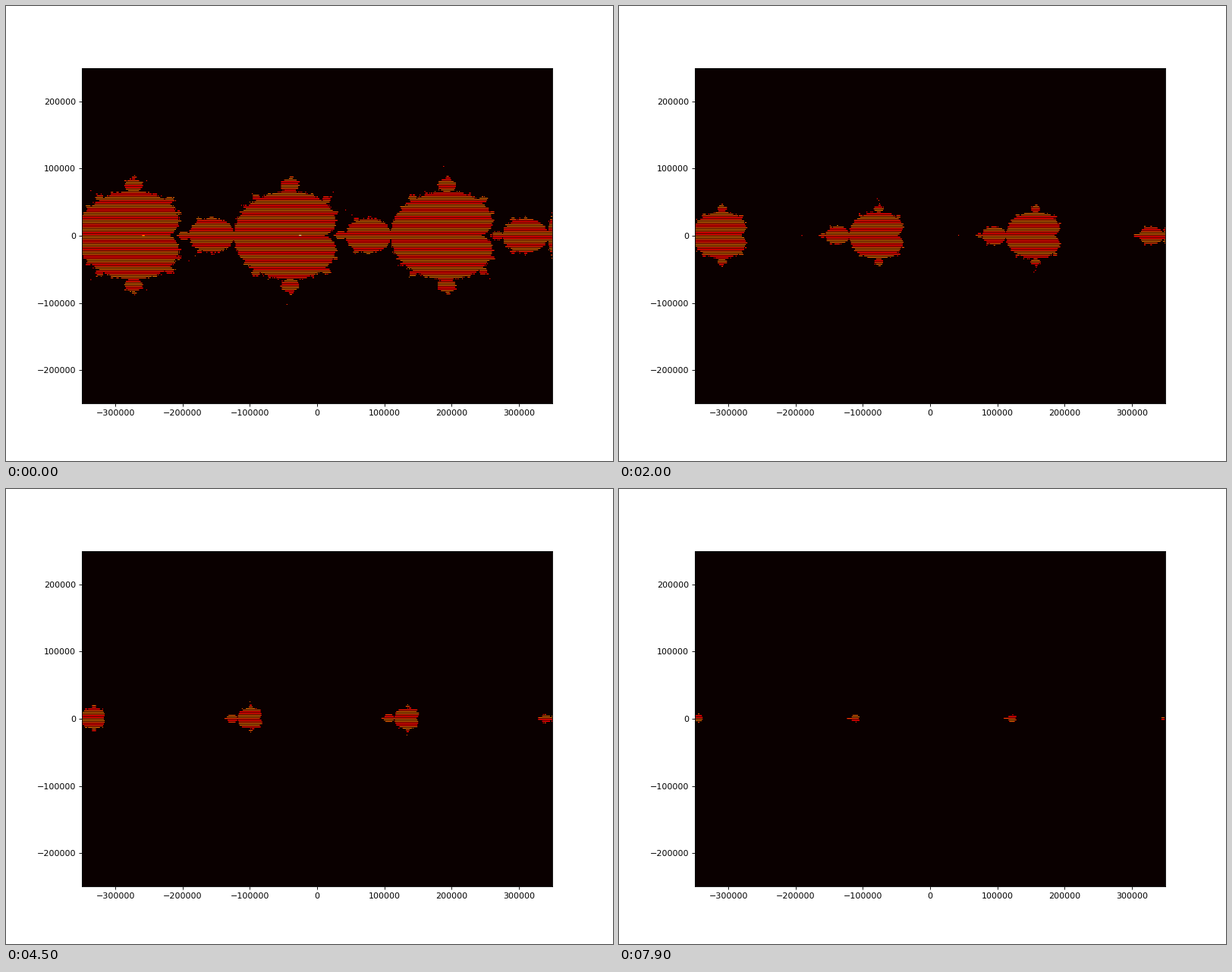
Recreate the animation shown at these times as a matplotlib script. Size 800 by 600 pixels, loop 8000 ms.

```python
import numpy as np
import matplotlib.pyplot as plt
from matplotlib.animation import FuncAnimation

COLS, ROWS = 800, 600        # sampling grid over the complex plane
SPAN_X, SPAN_Y = 3.5, 2.5    # half extents at the start
CENTER = -0.7
DECADE = 72                  # frames for the view to grow tenfold
MAX_ITER = 100
FRAMES, INTERVAL = 80, 100


def in_main_bodies(c):
    """Closed-form test for the main cardioid and the period-2 disc."""
    x, y2 = c.real, c.imag ** 2
    q = (x - 0.25) ** 2 + y2
    return (q * (q + x - 0.25) <= 0.25 * y2) | ((x + 1) ** 2 + y2 <= 0.0625)


def members(c):
    """Boolean membership of the Mandelbrot set for a flat array."""
    inside = in_main_bodies(c)
    idx = np.flatnonzero(~inside)
    c = c[idx]
    z = np.zeros_like(c)
    for _ in range(MAX_ITER):
        z = z * z + c
        keep = z.real ** 2 + z.imag ** 2 <= 4
        z, c, idx = z[keep], c[keep], idx[keep]
    inside[idx] = True
    return inside


def picture(n):
    """Row-major samples folded into a transposed shape, so rows interleave."""
    zoom = 10 ** (n / DECADE)
    x = CENTER + np.linspace(-SPAN_X, SPAN_X, COLS) * zoom
    y = np.linspace(-SPAN_Y, SPAN_Y, ROWS) * zoom
    cols = np.flatnonzero(np.abs(x) <= 2)
    rows = np.flatnonzero(np.abs(y) <= 1.2)
    c = x[cols][None, :] + 1j * y[rows][:, None]
    grid = np.zeros((ROWS, COLS))
    grid[np.ix_(rows, cols)] = members(c.ravel()).reshape(c.shape)
    return grid.reshape(COLS, ROWS)


fig, ax = plt.subplots(figsize=(10, 7.5), dpi=80)
image = ax.imshow(picture(0), cmap="hot", vmin=0, vmax=1, origin="lower",
                  extent=(-350000, 350000, -250000, 250000))


def update(n):
    image.set_data(picture(n))
    return [image]


anim = FuncAnimation(fig, update, frames=FRAMES, interval=INTERVAL,
                     repeat=True, repeat_delay=0)
plt.show()
```
